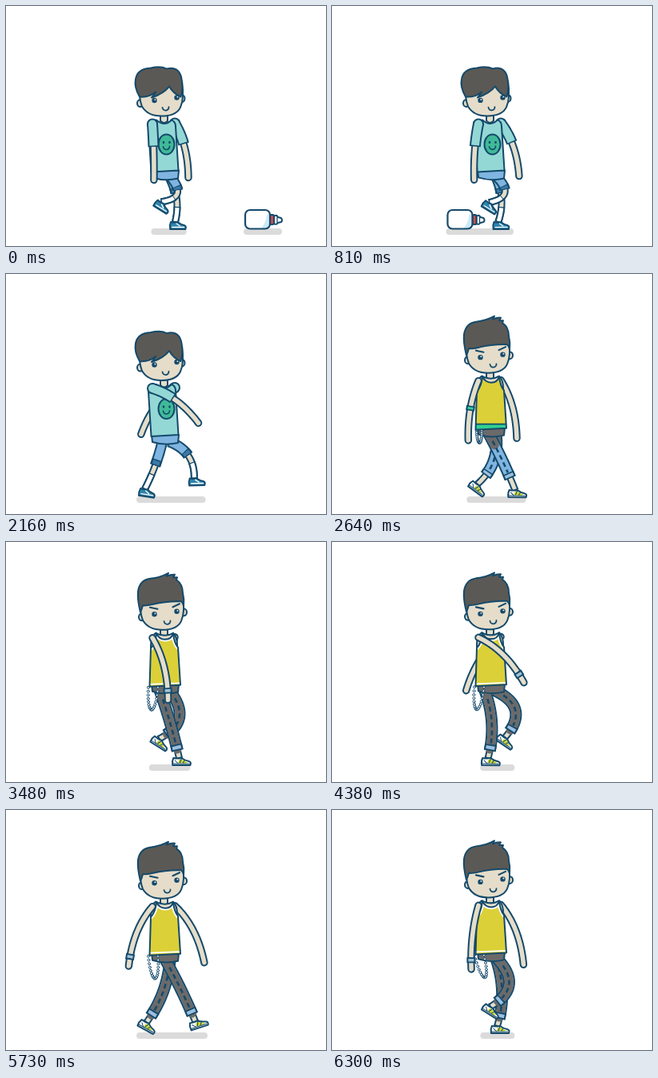
Write an HTML page with a canvas that moves like this. It is 400x300 px and loops after 6.33 s.

```html
<!DOCTYPE html>
<html>
<head>
<meta charset="utf-8">
<style>
html, body { margin: 0; width: 100%; height: 100%; overflow: hidden; background: #fff; }
canvas { display: block; }
</style>
</head>
<body>
<canvas id="stage" width="400" height="300"></canvas>
<script>
const ctx = document.getElementById('stage').getContext('2d');
const LOOP = 6330, STEP = LOOP / 8, TAU = Math.PI * 2;
const INK = '#154a6b', SKIN = '#e5ddca', HAIR = '#5b5955', TEAL = '#94d8d6', YELLOW = '#dcd038',
  GREEN = '#30cf91', BLUE = '#7fb5e0', GREY = '#6b6a6a', CUFF = '#9cbfe0', WHITE = '#fff', SHADE = '#dcdbdb';

const clamp = v => Math.max(0, Math.min(1, v));
const ramp = (t, a, b) => clamp((t - a) / (b - a));
const mix = (a, b, k) => a + (b - a) * k;
const rad = deg => deg * Math.PI / 180;

function shape(d, fill, line = 2, ink = INK) {
  const p = new Path2D(d);
  if (fill) { ctx.fillStyle = fill; ctx.fill(p); }
  if (line) { ctx.lineWidth = line; ctx.strokeStyle = ink; ctx.stroke(p); }
}

function oval(x, y, rx, ry, fill, line = 0) {
  ctx.beginPath();
  ctx.ellipse(x, y, rx, ry, 0, 0, TAU);
  ctx.fillStyle = fill;
  ctx.fill();
  if (line) { ctx.lineWidth = line; ctx.strokeStyle = INK; ctx.stroke(); }
}

function smile(x, y, r, line) {
  ctx.beginPath();
  ctx.arc(x, y, r, rad(-5), rad(175));
  ctx.lineWidth = line;
  ctx.strokeStyle = INK;
  ctx.stroke();
}

function pill(x, y, w, h, r, fill, line = 0) {
  ctx.beginPath();
  ctx.roundRect(x, y, w, h, r);
  ctx.fillStyle = fill;
  ctx.fill();
  if (line) { ctx.lineWidth = line; ctx.strokeStyle = INK; ctx.stroke(); }
}

// Limbs are quadratic curves [start, control, end]
function at(c, k) {
  const j = 1 - k;
  return [0, 1].map(i => j * j * c[0][i] + 2 * j * k * c[1][i] + k * k * c[2][i]);
}

function trace(c, a, b, width, color) {
  ctx.beginPath();
  for (let i = 0; i <= 18; i++) ctx.lineTo(...at(c, mix(a, b, i / 18)));
  ctx.lineWidth = width;
  ctx.strokeStyle = color;
  ctx.stroke();
}

function tube(c, a, b, width, color, cap = 'butt') {
  const edge = cap === 'butt' ? 0.022 : 0;
  ctx.lineCap = cap;
  trace(c, a - edge, b + edge, width + 4, INK);
  trace(c, a, b, width, color);
  ctx.lineCap = 'round';
}

// Step phase, x, y, tilt in degrees
const FOOT = [
  [-.2, 232, 275, 0], [-.1, 219, 275, 0], [0, 204, 275, 0], [.16, 178, 275, 5], [.2, 174, 272, 20],
  [.3, 181, 269, 36], [.4, 192, 252, 32], [.46, 198, 252, 32], [.53, 215, 250, 35],
  [.65, 236, 258, 5], [.74, 241, 268, -18]
];

function key(i) {
  const n = FOOT.length, turn = Math.floor(i / n), row = FOOT[i - turn * n];
  return [row[0] + turn, ...row.slice(1)];
}

function footAt(phase) {
  const u = ((phase + .2) % 1 + 1) % 1 - .2;
  let i = 0;
  while (key(i + 1)[0] <= u) i++;
  const [a, b, c, d] = [-1, 0, 1, 2].map(o => key(i + o));
  const h = c[0] - b[0], s = (u - b[0]) / h, s2 = s * s, s3 = s2 * s;
  return [1, 2, 3].map(n => {
    const m0 = (c[n] - a[n]) / (c[0] - a[0]) * h, m1 = (d[n] - b[n]) / (d[0] - b[0]) * h;
    return b[n] * (2 * s3 - 3 * s2 + 1) + m0 * (s3 - 2 * s2 + s) + c[n] * (3 * s2 - 2 * s3) + m1 * (s3 - s2);
  });
}

function shoe([x, y, tilt], kid) {
  ctx.save();
  ctx.translate(x, y);
  ctx.rotate(rad(tilt));
  if (kid) ctx.scale(.88, 1);
  shape('M-10 -5 Q-5 -4 0 -5 Q4 -2 9 -1 Q13 0 11 4 L-11 4 Q-12 -1 -10 -5Z', kid ? '#2f84ad' : WHITE);
  if (kid) {
    shape('M-8 1.5 H9', null, 1.3, WHITE);
    shape('M-2 -3 L3 0', null, 1.4, WHITE);
  } else {
    shape('M-3 -3 Q1 -4 4 -1 L8 0 L5 2 L-4 1Z', '#cbd52f', 0);
    shape('M-8 -2 L-4 2 M0 -4 L-2 1 M4 -2 L2 1', null, 1);
    shape('M-10 2 H10', null, 1);
  }
  ctx.restore();
}

function leg(hipX, hipY, foot, s) {
  const tilt = rad(foot[2]);
  const end = [foot[0] - 3 * Math.cos(tilt) + 6 * Math.sin(tilt), foot[1] - 3 * Math.sin(tilt) - 6 * Math.cos(tilt)];
  const dx = end[0] - hipX, dy = end[1] - hipY, d = Math.hypot(dx, dy), full = 272 - hipY;
  const bend = .6 * Math.sqrt(Math.max(16, full * full - d * d));
  const c = [[hipX, hipY], [hipX + dx / 2 + dy / d * bend, hipY + dy / 2 - dx / d * bend], end];
  const len = mix(.34, .78, s.cloth) + .1 * s.adult;
  tube(c, 0, 1, 5, SKIN);
  if (s.kid) tube(c, .7, 1, 5, WHITE);
  shoe(foot, s.kid);
  tube(c, 0, len, mix(9, 11, s.cloth), BLUE);
  if (s.grey > 0) trace(c, 0, len * s.grey, 11, GREY);
  if (s.kid) tube(c, len - .08, len, 9, '#397aa9');
  else {
    ctx.lineCap = 'butt';
    ctx.setLineDash([6, 4]);
    trace(c, .12, len - .08, 2.6, INK);
    ctx.setLineDash([]);
    tube(c, len - .05, len, 11, CUFF);
  }
}

function arm(x, y, deg, near, s) {
  const len = mix(70, 80, s.grow);
  const point = (k, a) => [x + len * k * Math.sin(rad(a)), y + len * k * Math.cos(rad(a))];
  const c = [[x, y], point(.47, deg + 20 * Math.tanh(deg / 12)), point(1, deg)];
  tube(c, 0, 1, 5.5, SKIN, 'round');
  if (s.kid) {
    oval(x, y, 7, 7, INK);
    tube(c, 0, .4, 10, TEAL);
    oval(x, y, 5, 5, TEAL);
  } else if (near) {
    const band = mix(.47, .85, s.adult);
    tube(c, band, band + .04, 7, s.adult > .5 ? '#9fc3d5' : GREEN);
  }
}

function chain(p, size) {
  const low = 186 + 5 * Math.cos(TAU * p);
  for (let i = 0; i <= 18; i++) {
    const a = i / 18 * Math.PI, drop = Math.sin(a);
    oval(mix(184, low, drop) - 6 * size * Math.cos(a), 182 + 28 * size * drop, 1.5, 1.5, WHITE, 1);
  }
}

function torso(s) {
  if (s.kid) {
    shape('M188 115 Q179 116 178 124 L181.5 180 L215.5 178 L212 123 Q212 117 207 115 Q198 124 188 115Z', TEAL);
    oval(200.5, 145.5, 10, 12.5, '#3fba98', 2);
    oval(197, 143, 1.3, 1.7, INK);
    oval(204.5, 143, 1.3, 1.7, INK);
    smile(200.5, 148, 4, 1.6);
    return;
  }
  const tank = 'M188 114 Q187 127 181 133 L179.5 181 L218 179 L215 132 Q210 126 209 114 Q207 122 199 122 Q191 122 188 114Z';
  shape('M187 114 Q181 118 181 130 L182 178 L216 178 L214 129 Q214 119 209 114 Q199 120 187 114Z', SKIN);
  ctx.save();
  ctx.clip(new Path2D(tank));
  ctx.fillStyle = TEAL;
  ctx.fillRect(170, 110, 60, 75);
  const edge = mix(114, 181, s.wipe);
  ctx.fillStyle = YELLOW;
  ctx.fillRect(170, 110, 60, edge - 110);
  if (s.adult < .5) {
    ctx.fillStyle = GREEN;
    ctx.fillRect(170, edge - 7, 60, 7);
    shape(`M178 ${edge - 7} H220`, null, 1.8);
  } else {
    shape('M180 178 L218 176.5', null, 1.8, WHITE);
    shape('M188 114 Q187 127 181 133 M215 132 Q210 126 209 114 Q207 122 199 122 Q191 122 188 114', null, 5.5, WHITE);
  }
  ctx.restore();
  shape(tank, null);
}

function head(s) {
  const kid = s.kid;
  oval(kid ? 168 : 170, 94, 4, 4.5, SKIN, 2);
  oval(kid ? 219.5 : 222, 88, 4, 4.5, SKIN, 2);
  ctx.save();
  if (kid) ctx.translate(-1, 0);
  shape('M168 72 Q167 88 171 98 Q178 110 195 110 Q214 110 219 99 Q224 88 221 67Z', SKIN);
  ctx.restore();
  for (const [x, y] of [[185.5, 90.5], [213.5, 87]]) {
    oval(x, y, 3.2, 3.2, INK);
    oval(x + .9, y - 1, .9, .9, WHITE);
  }
  smile(kid ? 199.5 : 201.5, 99, 4, 1.8);
  if (kid) {
    shape('M167 86 Q160 74 162 64 Q164 51 181 50 Q193 47 201 51 Q215 47 219 61 Q222 75 218.5 86 Q209 82 204 73 Q197 82 182 87 Q186 83 187 80 Q179 87 167 86Z', HAIR);
  } else {
    shape('M180 82 L189.5 84 M208.5 81.5 L217 77.5', null, 2.1);
    shape('M168 88 Q164 72 165 62 Q167 48 180 46 Q192 45 203 39 L201 43 Q206 40.5 211 41 L209 44.5 L214 44.5 L213 47.5 Q221 53 221 64 Q223 72 222 80 Q221 76 219 74.5 Q200 74 184 78 Q175 80 171 79.5 Q170 84 168 88Z', HAIR);
  }
}

function bottle(x) {
  ctx.save();
  ctx.translate(x, 0);
  pill(-1, 278, 48, 8, 4, SHADE);
  shape('M37 263 Q40 260 42 264 L46 265 Q48 268 46 270 L42 271 Q40 274 37 272Z', WHITE);
  shape('M41 264 V271', null, 1.3);
  pill(32, 261, 5, 12, 1.5, '#cf4a4e', 2);
  pill(1, 255, 31, 23.5, 6, WHITE);
  ctx.save();
  ctx.clip();
  shape('M19 280 Q26 274 28 261 L33 259 V280Z', '#cdeaf8', 0);
  ctx.restore();
  pill(1, 255, 31, 23.5, 6, 'transparent', 2.2);
  ctx.restore();
}

function draw(t) {
  const grow = ramp(t, 1890, 3300);
  const s = {
    grow, kid: t < 2250,
    cloth: ramp(t, 1950, 2640),
    wipe: ramp(t, 2220, 2640),
    grey: ramp(t, 2500, 3060),
    adult: ramp(t, 2670, 3060)
  };
  const p = t / STEP - .07 * (1 - grow);
  const lift = 28 * (1 - grow) - .7 * Math.cos(2 * TAU * p);
  const near = footAt(p - .5), far = footAt(p);
  const nearArm = 12 + 42 * Math.sin(TAU * (p - .39));
  const farArm = -38 * Math.sin(TAU * (p - .37));

  ctx.fillStyle = WHITE;
  ctx.fillRect(0, 0, 400, 300);
  ctx.lineJoin = ctx.lineCap = 'round';

  const left = Math.min(near[0], far[0]) - 13, right = Math.max(near[0] + 11, far[0] + 11, left + 43);
  pill(left, 278, right - left, 8, 4, SHADE);
  const bx = 298 - t * 309 / 1620;
  if (bx > -50) bottle(bx);

  ctx.save();
  ctx.translate(0, lift);
  arm(211, 119, farArm, false, s);
  ctx.restore();

  leg(205, 187 + lift, far, s);
  leg(199 + 8 * Math.cos(TAU * p), 187 + lift, near, s);

  ctx.save();
  ctx.translate(0, lift);
  shape('M182 178 L183 187 Q199 192 215 188 L216 178Z', s.grey > 0 ? GREY : BLUE);
  if (!s.kid) chain(p, mix(.55, 1, s.adult));
  shape('M193 106 V116 Q198 121 202 116 V106Z', SKIN);
  torso(s);
  arm(183, 120, nearArm, true, s);
  head(s);
  ctx.restore();
}

const start = performance.now();
function tick() {
  const t = (performance.now() - start) % LOOP;
  draw(Math.floor(t / 30) * 30);
  requestAnimationFrame(tick);
}
tick();
</script>
</body>
</html>
```
